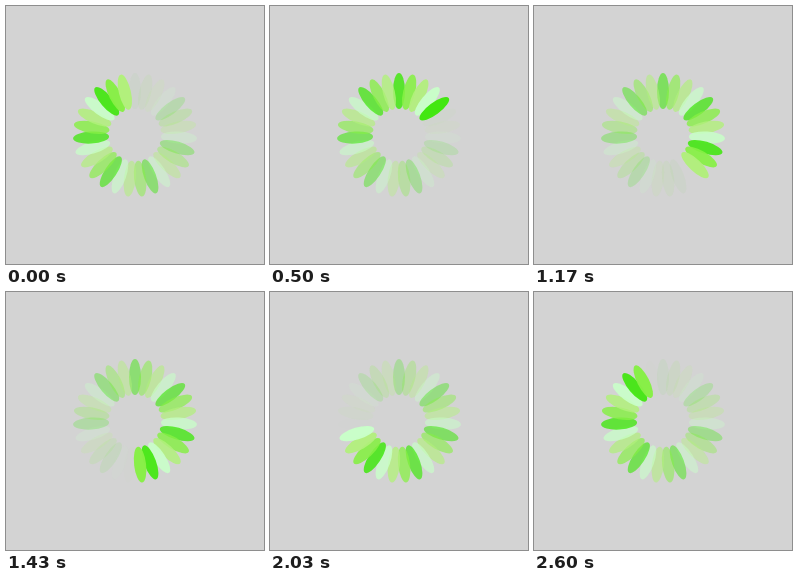
Write an HTML page with a canvas that moves like this. It is 258 px wide and 258 px high and loops after 2630 ms.

```html
<!DOCTYPE html>
<html lang="en">
<head>
<meta charset="utf-8">
<title>Petal spinner</title>
<style>
  html, body { margin: 0; width: 100%; height: 100%; overflow: hidden; background: #d3d3d3; }
  canvas { display: block; width: 258px; height: 258px; }
</style>
</head>
<body>
<canvas id="stage" width="258" height="258"></canvas>
<script>
const ctx = document.getElementById('stage').getContext('2d');
const SIZE = 258;
const LOOP = 2630;
const FRAMES = 79;
const FRAME_MS = 100 / 3;
const PETALS = 27;
const COLORS = ['#43e711', '#87f045', '#b2f07c', '#c9ffc9'];
const RING = 44;
const HALF_LENGTH = 18;
const HALF_WIDTH = 6;

function drawPetal(index, opacity) {
  ctx.save();
  ctx.translate(SIZE / 2, SIZE / 2);
  ctx.rotate(index / PETALS * 2 * Math.PI);
  ctx.globalAlpha = opacity;
  ctx.fillStyle = COLORS[index % COLORS.length];
  ctx.beginPath();
  ctx.ellipse(0, -RING, HALF_WIDTH, HALF_LENGTH, 0, 0, 2 * Math.PI);
  ctx.fill();
  ctx.restore();
}

function draw(ms) {
  // Steps at 30 per second, with start times rounded to 10 ms.
  const step = Math.floor((ms % LOOP + 5) / FRAME_MS) % FRAMES;
  const progress = step / FRAMES;
  ctx.fillStyle = '#d3d3d3';
  ctx.fillRect(0, 0, SIZE, SIZE);
  for (let i = 0; i < PETALS; i++) {
    // Each petal lights up at once, then fades out over a full loop.
    const lit = (i + 1) / PETALS;
    const age = (progress - lit + 1) % 1;
    drawPetal(i, 1 - age);
  }
}

const start = performance.now();
function tick() {
  draw(performance.now() - start);
  requestAnimationFrame(tick);
}
tick();
</script>
</body>
</html>
```
